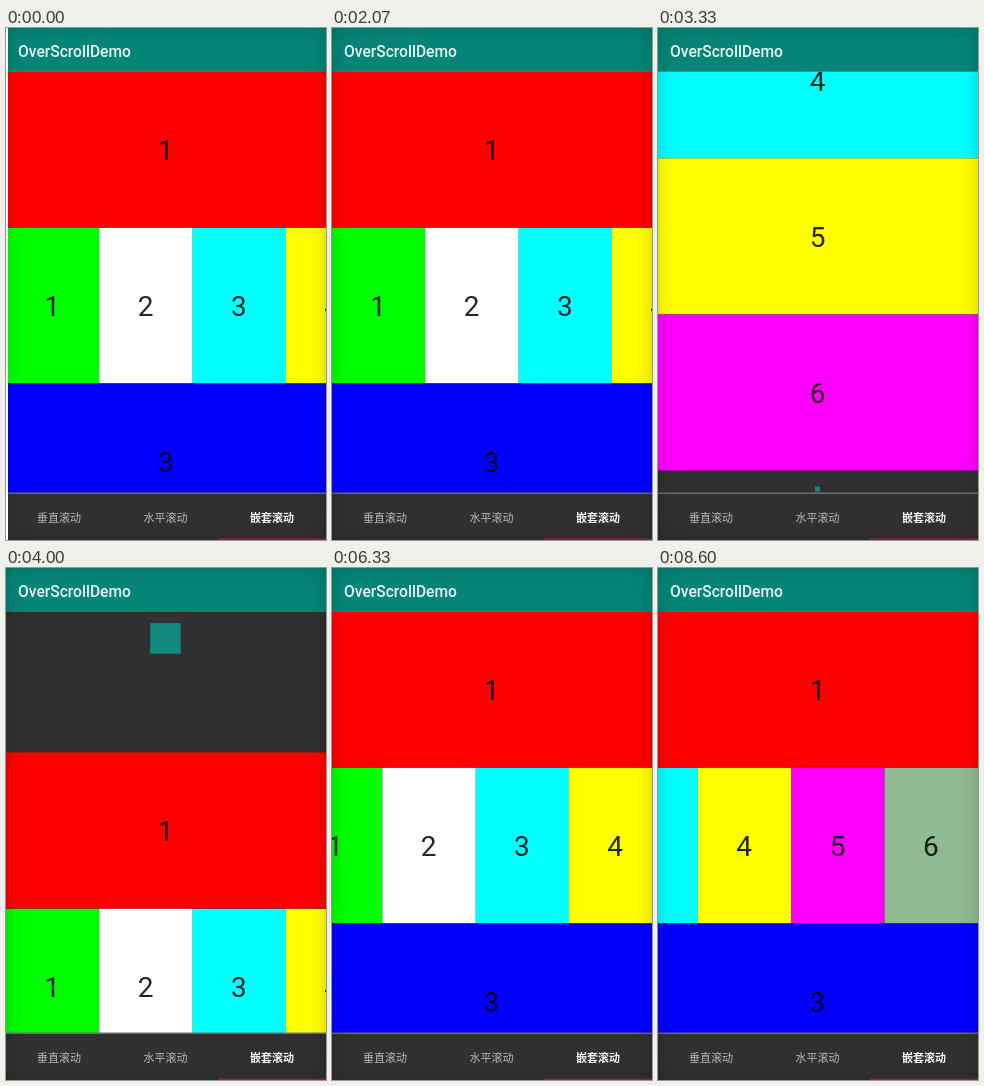
Write an HTML page that moves like this. It is 320 px wide and 512 px high and loops after 8.67 s.

```html
<!DOCTYPE html>
<html lang="zh">
<head>
<meta charset="utf-8">
<title>OverScrollDemo</title>
<style>
  html, body { margin: 0; width: 100%; height: 100%; overflow: hidden; background: #303030; }
  #stage { position: relative; width: 320px; height: 512px; overflow: hidden; }
  #stage > svg { display: block; }
  #shade { position: absolute; inset: 0; box-shadow: inset 0 0 18px rgba(0, 0, 0, .2); }
  #edge { position: absolute; left: 0; top: 0; width: 1.5px; height: 100%; background: #fff; }
  text { font-family: Roboto, "Noto Sans", sans-serif; }
  .num { font-size: 28px; text-anchor: middle; fill: rgba(0, 0, 0, .85); }
  .title { font-size: 15.6px; font-weight: 500; fill: #eaf5f3; }
  .tab { font: 500 11px "Noto Sans CJK SC", "Noto Sans CJK", sans-serif; text-anchor: middle; fill: #b9b9b9; }
  .tab.on { fill: #f4f4f4; font-weight: 700; }
</style>
</head>
<body>
<div id="stage">
  <svg width="320" height="512" viewBox="0 0 320 512">
    <rect width="320" height="512" fill="#303030"/>
    <svg y="43.5" width="320" height="422" overflow="hidden">
      <rect id="vIcon" fill="#11897c"/>
      <g id="column">
        <svg id="nest" y="156" width="320" height="156" overflow="hidden">
          <rect width="320" height="156" fill="#303030"/>
          <rect id="hIcon" fill="#11897c"/>
          <g id="row"></g>
        </svg>
      </g>
    </svg>
    <rect width="320" height="43" fill="#048577"/>
    <rect y="43" width="320" height="1" fill="#8a8078" opacity=".6"/>
    <text class="title" x="12" y="28.5">OverScrollDemo</text>
    <rect y="465" width="320" height="47" fill="#303030"/>
    <rect y="464.5" width="320" height="1.5" fill="#6c6c70"/>
    <text class="tab" x="53" y="494">垂直滚动</text>
    <text class="tab" x="159.5" y="494">水平滚动</text>
    <text class="tab on" x="266" y="494">嵌套滚动</text>
    <rect x="212" y="510.5" width="108" height="1.5" fill="#a5214f"/>
  </svg>
  <div id="shade"></div>
  <div id="edge"></div>
</div>
<script>
const LOOP = 8670, STEP = 200 / 3;
const VIEW_W = 320, VIEW_H = 422, ROW_H = 156, COL_W = 280 / 3;
const END_Y = 6 * ROW_H - VIEW_H, END_X = 6 * COL_W - VIEW_W;
const byId = id => document.getElementById(id);

const linear = p => p;
const easeOut = p => 1 - (1 - p) ** 2;
const easeBoth = p => p * p * (3 - 2 * p);

// [time, offset, easing towards it]
const vertical = [
  [0, 0], [800, 0], [1533, 162, easeOut], [1733, 172, easeOut], [2067, 0, easeBoth],
  [2600, 0], [2867, -494, easeBoth], [3000, -630, easeOut], [3467, -END_Y, easeBoth],
  [3733, -END_Y], [4000, 141, easeBoth], [4267, 0, easeBoth], [LOOP, 0]
];
const horizontal = [
  [0, 0], [5067, 0], [5133, 43.5], [5400, 92, easeOut], [5867, 0, easeBoth],
  [6267, 0], [6533, -276, easeBoth], [6800, -END_X, easeBoth],
  [7133, -END_X], [7200, -266], [7467, -318, easeOut], [7867, -END_X, easeBoth], [LOOP, -END_X]
];

function offsetAt(keys, t) {
  const i = Math.max(1, keys.findIndex(k => k[0] >= t));
  const [t0, v0] = keys[i - 1], [t1, v1, ease = linear] = keys[i];
  return v0 + (v1 - v0) * ease((t - t0) / (t1 - t0));
}

function addCell(parent, x, y, w, fill, label) {
  const add = (tag, attrs) => {
    const el = document.createElementNS("http://www.w3.org/2000/svg", tag);
    for (const k in attrs) el.setAttribute(k, attrs[k]);
    return parent.appendChild(el);
  };
  add("rect", { x, y, width: w, height: ROW_H, fill });
  add("text", { x: x + w / 2 - .5, y: y + 88.5, class: "num" }).textContent = label;
}

["#f00", null, "#00f", "#0ff", "#ff0", "#f0f"].forEach((fill, i) => {
  if (fill) addCell(byId("column"), 0, i * ROW_H, VIEW_W, fill, i + 1);
});
["#0f0", "#fff", "#0ff", "#ff0", "#f0f", "#90ba91"].forEach((fill, i) =>
  addCell(byId("row"), i * COL_W, 0, COL_W, fill, i + 1));

function placeIcon(el, cx, cy, size) {
  const s = Math.min(size, 43);
  el.setAttribute("x", cx - s / 2);
  el.setAttribute("y", cy - s / 2);
  el.setAttribute("width", s);
  el.setAttribute("height", s);
}

// The gap opened at either end, and where its icon is centred
function overscroll(offset, end, view, ratio) {
  const atStart = offset > 0;
  const gap = atStart ? offset : Math.max(0, -offset - end);
  return { gap, centre: atStart ? gap * ratio : view - gap * ratio };
}

function draw(now) {
  const t = Math.floor((now % LOOP + 4) / STEP) * STEP % LOOP;
  const y = offsetAt(vertical, t), x = offsetAt(horizontal, t);
  byId("column").setAttribute("transform", `translate(0 ${y})`);
  byId("row").setAttribute("transform", `translate(${x} 0)`);
  const v = overscroll(y, END_Y, VIEW_H, .191);
  const h = overscroll(x, END_X, VIEW_W, .5);
  placeIcon(byId("vIcon"), 159.5, v.centre, v.gap * .217);
  placeIcon(byId("hIcon"), h.centre, ROW_H / 2 - 1, h.gap * .58);
  byId("edge").style.visibility = t < 130 ? "visible" : "hidden";
}

function tick() {
  draw(performance.now());
  requestAnimationFrame(tick);
}
tick();
</script>
</body>
</html>
```
